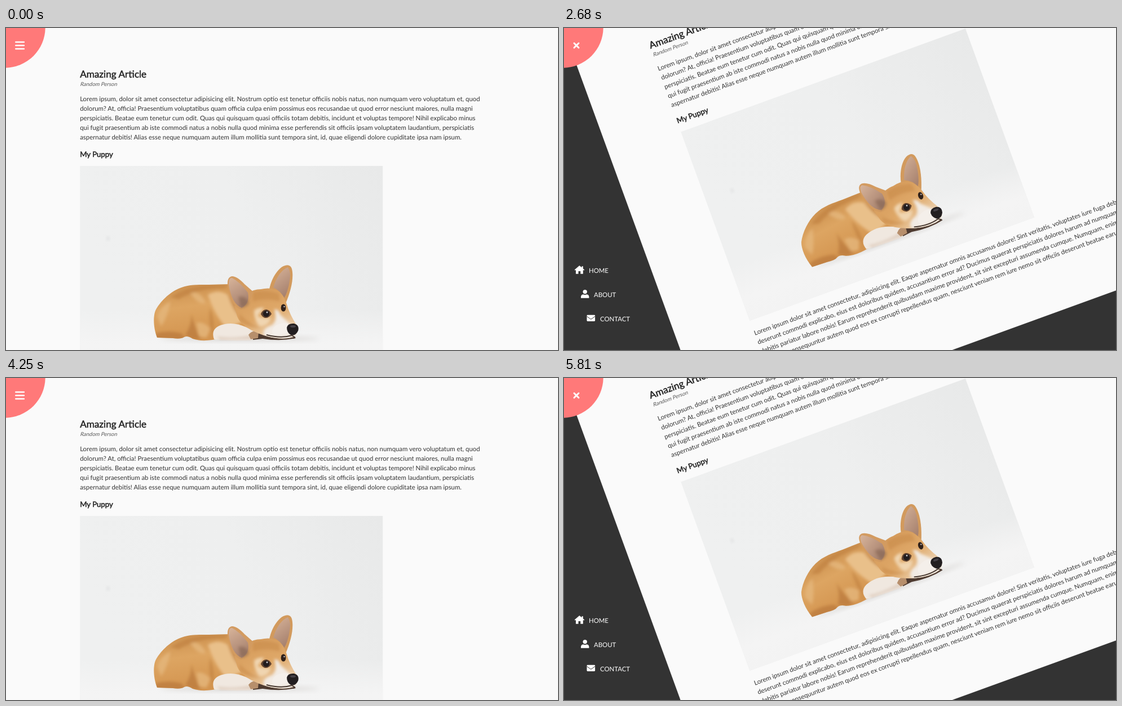
These frames come from a looping animation (979x572 px, 6.88 s). An HTML page:

```html
<!DOCTYPE html>
<html lang="en">
<head>
<meta charset="utf-8">
<title>Rotating navigation</title>
<style>
  html, body { margin: 0; width: 100%; height: 100%; overflow: hidden; background: #333; }
  svg { display: block; width: 979px; height: 572px; }
  text { font: 11.39px Lato, sans-serif; fill: #333; text-rendering: geometricPrecision; white-space: pre; }
  .heading { fill: #222; stroke: #222; stroke-width: .5px; }
  #nav text { fill: #fff; }
  .tap { fill: #33b5e5; fill-opacity: .4; }
</style>
</head>
<body>
<svg viewBox="0 0 979 572">
  <defs>
    <linearGradient id="wall" x1="0" y1=".3" x2="1" y2="0">
      <stop offset="0" stop-color="#eff0f0"/>
      <stop offset=".5" stop-color="#eeefef"/>
      <stop offset="1" stop-color="#e8e9e9"/>
    </linearGradient>
    <linearGradient id="floor" x1="0" y1="0" x2="0" y2="1">
      <stop offset="0" stop-color="#f4f4f4" stop-opacity="0"/>
      <stop offset=".6" stop-color="#f4f4f4"/>
      <stop offset="1" stop-color="#f3f3f3"/>
    </linearGradient>
    <linearGradient id="fur" x1="0" y1="0" x2=".25" y2="1">
      <stop offset="0" stop-color="#c98d4c"/>
      <stop offset=".45" stop-color="#dda562"/>
      <stop offset="1" stop-color="#d3944f"/>
    </linearGradient>
    <linearGradient id="face" x1="0" y1="0" x2=".6" y2="1">
      <stop offset="0" stop-color="#d39858"/>
      <stop offset=".6" stop-color="#dfa868"/>
      <stop offset="1" stop-color="#ecd3b4"/>
    </linearGradient>
    <linearGradient id="innerEar" x1="0" y1="0" x2=".4" y2="1">
      <stop offset="0" stop-color="#d8b49a"/>
      <stop offset="1" stop-color="#a88370"/>
    </linearGradient>
    <filter id="soft" x="-30%" y="-60%" width="160%" height="220%"><feGaussianBlur stdDeviation="4"/></filter>
    <filter id="hazy" x="-20%" y="-20%" width="140%" height="140%"><feGaussianBlur stdDeviation="2.4"/></filter>
    <clipPath id="body">
      <path id="bodyShape" d="M268 550C261 532 261 512 265 502C273 486 290 470 306 463C323 455 342 456 360 456L397 455L446 486L440 540L400 548L366 554Q345 557 331 552Q322 546 316 549Q310 553 296 551Z"/>
    </clipPath>
    <clipPath id="head">
      <path id="headShape" d="M405 494C420 475 434 464 452 464Q468 460 481 466Q493 474 497 488Q502 507 515 527Q521 541 510 549Q490 555 464 548C443 542 416 530 410 512Z"/>
    </clipPath>
  </defs>

  <rect width="979" height="572" fill="#333"/>

  <g id="page">
    <rect x="-2" y="-1" width="1200" height="774.6" fill="#fafafa"/>
    <g id="article"></g>

    <g id="photo">
      <rect x="131.2" y="245" width="537" height="357" fill="url(#wall)"/>
      <rect x="131.2" y="500" width="537" height="102" fill="url(#floor)"/>
      <ellipse cx="181" cy="374" rx="3" ry="4" fill="#e3e4e5" filter="url(#hazy)"/>
      <ellipse cx="415" cy="552" rx="140" ry="4" fill="#c9c6c3" opacity=".6" filter="url(#soft)"/>

      <use href="#bodyShape" fill="url(#fur)"/>
      <g clip-path="url(#body)">
        <g filter="url(#hazy)">
          <path fill="#e9c08a" d="M358 474Q378 462 396 476Q406 504 422 520L392 534Q372 514 358 474Z"/>
          <path fill="#e5b77c" opacity=".8" d="M268 512Q276 492 292 486Q286 514 275 530ZM326 470Q345 466 354 488Q342 494 326 470ZM338 524Q350 520 362 534L356 550L342 548Z"/>
          <path fill="#b57436" opacity=".6" d="M266 542Q290 536 312 543L320 554H264ZM318 545Q329 530 329 508Q335 535 346 553H330Z"/>
          <path fill="#b9783b" opacity=".5" d="M292 478Q330 452 394 457L388 462Q340 462 306 482ZM362 496Q372 524 366 545Q358 520 362 496ZM392 470L410 492L424 520Q402 508 392 470Z"/>
        </g>
      </g>
      <path fill="#f0e8e0" d="M369 553Q363 536 378 529Q400 520 425 531L450 542L446 554L410 555Z"/>
      <path fill="#d8c3b2" opacity=".7" filter="url(#hazy)" d="M374 548Q400 553 436 546L436 553L380 554Z"/>
      <path fill="#4d3a30" d="M438 545Q446 538 456 543Q470 547 508 547L514 551Q488 557 455 552L438 554Z"/>
      <path fill="#b78f6c" d="M430 545Q438 535 448 540L447 551L434 553Z"/>

      <path fill="#d29a5d" d="M467 464C470 448 480 429 492 423Q504 418 507 428C511 444 505 468 496 489L478 474Z"/>
      <path fill="url(#innerEar)" d="M474 461C479 443 489 429 500 425Q506 434 503 449Q500 469 493 480Q488 467 474 461Z"/>
      <use href="#headShape" fill="url(#face)"/>
      <g clip-path="url(#head)">
        <path fill="#c58746" opacity=".5" filter="url(#hazy)" d="M438 470Q460 464 484 472L486 486Q460 478 438 486ZM414 508Q432 526 450 532Q432 534 414 520Z"/>
        <path fill="#f0d5b1" filter="url(#hazy)" d="M440 502Q446 496 458 497L446 512Q462 518 470 514Q466 530 450 530Q440 520 440 502Z"/>
        <path fill="#f2ebe4" filter="url(#hazy)" d="M476 500Q482 498 487 510L502 524L520 544L500 554L458 548Q452 534 472 528Q482 520 476 500Z"/>
        <path fill="#f4efea" d="M478 529Q490 522 500 525L500 542L478 546Q466 540 478 529Z"/>
      </g>
      <path fill="#d39b60" d="M393 457Q392 442 401 441Q410 441 423 455L439 469Q433 488 417 500Q398 495 393 457Z"/>
      <path fill="url(#innerEar)" d="M395 455Q395 443 401 444Q415 451 429 470Q433 489 418 497Q400 490 395 455Z"/>
      <path fill="#80604f" opacity=".55" filter="url(#hazy)" d="M412 478Q426 474 431 489Q425 497 417 497Z"/>

      <path d="M452 508Q455 500 462 500Q468 501 471 508Q466 516 459 515Q454 513 452 508Z" fill="#5f422f"/>
      <circle cx="461.5" cy="507.5" r="5.6" fill="#211c1e"/>
      <circle cx="463" cy="505" r="1.5" fill="#c9c8ce"/>
      <ellipse cx="492" cy="497" rx="4.4" ry="6.6" fill="#30211a"/>
      <circle cx="493.5" cy="495" r="1.2" fill="#c9c8ce"/>
      <path d="M498 532Q500 524 511 525Q521 528 518 538Q513 548 505 545Q498 541 498 532Z" fill="#221e20"/>
      <ellipse cx="509" cy="530" rx="5" ry="2" fill="#55515a" opacity=".7"/>
      <path d="M462 545Q488 552 507 546L513 550" fill="none" stroke="#463830" stroke-width="2"/>
    </g>

    <g id="dial">
      <circle cx="-2" cy="-1" r="71.7" fill="#ff7979"/>
      <path d="M17.3 25H31.9M17.3 31H31.9M17.3 37H31.9" stroke="#fff" stroke-width="2.5" stroke-linecap="round"/>
      <rect id="tapOpen" class="tap" x="12" y="-1" width="25.5" height="66"/>
      <g transform="rotate(90 -2 -1)">
        <path d="M18 27L26 35M26 27L18 35" stroke="#fff" stroke-width="2.9" stroke-linecap="round"/>
        <rect id="tapClose" class="tap" x="12" y="-1" width="21" height="66"/>
      </g>
    </g>
  </g>

  <g id="nav">
    <g>
      <path fill="#fff" d="M27.4 422L31.5 425.4V423.2H33.8V427.4L36.2 429.5L35.2 430.7L33.8 429.8V436.8H29.3V432H25.5V436.8H21V429.8L19.7 430.7L18.7 429.5Z"/>
      <text x="44" y="434.6">HOME</text>
    </g>
    <g>
      <circle cx="37.2" cy="468.6" r="3.7" fill="#fff"/>
      <path fill="#fff" d="M30 479.8V477.8Q30 473.4 34.4 473.2Q37.2 474.6 40 473.2Q44.4 473.4 44.4 477.8V479.8Z"/>
      <text x="53" y="477.6">ABOUT</text>
    </g>
    <g>
      <rect x="40.5" y="509.8" width="14.6" height="11.2" rx="1.4" fill="#fff"/>
      <path d="M40.5 512.2L46.4 516.6Q47.8 517.5 49.2 516.6L55.1 512.2" fill="none" stroke="#333" stroke-width="1"/>
      <text x="64" y="520.7">CONTACT</text>
    </g>
  </g>
</svg>

<script>
const byId = id => document.getElementById(id);
const article = byId('article');

function addText(content, y, attributes = {}) {
  const node = document.createElementNS('http://www.w3.org/2000/svg', 'text');
  const { style, ...rest } = attributes;
  for (const [key, value] of Object.entries({ x: 131.2, y, ...rest })) node.setAttribute(key, value);
  if (style) node.style.cssText = style;
  node.textContent = content;
  article.append(node);
}

const addParagraph = (lines, y) => lines.forEach((line, i) => addText(line, y + i * 17.2));

addText('Amazing Article', 87.8, { class: 'heading', style: 'font-size:17.15px' });
addText('Random Person', 0, {
  x: 0, transform: 'translate(131.2 102.8) skewX(-14)', style: 'font-size:9.5px;fill:#555'
});
addParagraph([
  'Lorem ipsum, dolor sit amet consectetur adipisicing elit. Nostrum optio est tenetur officiis nobis natus, non numquam vero voluptatum et, quod',
  'dolorum? At, officia! Praesentium voluptatibus quam officia culpa enim possimus eos recusandae ut quod error nesciunt maiores, nulla magni',
  'perspiciatis. Beatae eum tenetur cum odit. Quas qui quisquam quasi officiis totam debitis, incidunt et voluptas tempore! Nihil explicabo minus',
  'qui fugit praesentium ab iste commodi natus a nobis nulla quod minima esse perferendis sit officiis ipsam voluptatem laudantium, perspiciatis',
  'aspernatur debitis! Alias esse neque numquam autem illum mollitia sunt tempora sint, id, quae eligendi dolore cupiditate ipsa nam ipsum.'
], 129.6);
addText('My Puppy', 229, { class: 'heading', style: 'font-size:13.2px' });
addParagraph([
  'Lorem ipsum dolor sit amet consectetur, adipisicing elit. Eaque aspernatur omnis accusamus dolore! Sint veritatis, voluptates iure fuga debitis',
  'deserunt commodi explicabo, eius est doloribus quidem, accusantium error ad? Ducimus quaerat perspiciatis dolores harum ad numquam ipsum',
  'debitis pariatur labore nobis! Earum reprehenderit quibusdam maxime provident, sit sint excepturi assumenda cumque. Numquam, enim?',
  'Dolorem consequuntur autem quod eos ex corrupti repellendus quam, nesciunt veniam rem iure nemo sit officiis deserunt beatae earum in,'
], 629.5);

const LOOP = 6880, STEP = 70;
const TURN = 500, SLIDE = 400, SLIDE_DELAY = 260;
// Each click: first visible change, moment of the click, number of further steps.
const clicks = [
  { from: 1910, at: 1924, steps: 11, open: true },
  { from: 3760, at: 3719, steps: 7, open: false },
  { from: 5040, at: 5054, steps: 11, open: true }
];
const items = [...byId('nav').children];
// Each item is indented further and hides by a larger share of its own width.
const hiddenShift = i => (1 + i / 2) * (97 - 10.75 * i);
const clamp = v => Math.min(1, Math.max(0, v));

// cubic-bezier(.42, 0, 1, 1)
function easeIn(x) {
  if (x <= 0 || x >= 1) return clamp(x);
  let low = 0, high = 1;
  for (let i = 0; i < 24; i++) {
    const u = (low + high) / 2;
    const bx = 1.26 * u * (1 - u) ** 2 + 3 * u * u * (1 - u) + u ** 3;
    if (bx < x) low = u; else high = u;
  }
  return 3 * low * low * (1 - low) + low ** 3;
}

function render(t) {
  const click = clicks.filter(c => c.from <= t).pop();
  let turn = 0, slide = 0, tap = 0;
  if (click) {
    const step = Math.min(click.steps, Math.floor((t - click.from) / STEP));
    const elapsed = click.from + step * STEP - click.at;
    turn = clamp(elapsed / TURN);
    slide = easeIn((elapsed - (click.open ? SLIDE_DELAY : 0)) / SLIDE);
    tap = clamp((150 - elapsed) / 70);
    if (!click.open) { turn = 1 - turn; slide = 1 - slide; }
  }
  byId('page').setAttribute('transform', `rotate(${-20 * turn} -2 -1)`);
  byId('dial').setAttribute('transform', `rotate(${-70 * turn} -2 -1)`);
  byId('tapOpen').setAttribute('opacity', click && click.open ? tap : 0);
  byId('tapClose').setAttribute('opacity', click && !click.open ? tap : 0);
  items.forEach((item, i) => item.setAttribute('transform', `translate(${-hiddenShift(i) * (1 - slide)} 0)`));
}

const start = performance.now();
function tick() {
  render((performance.now() - start) % LOOP);
  requestAnimationFrame(tick);
}
tick();
</script>
</body>
</html>
```
